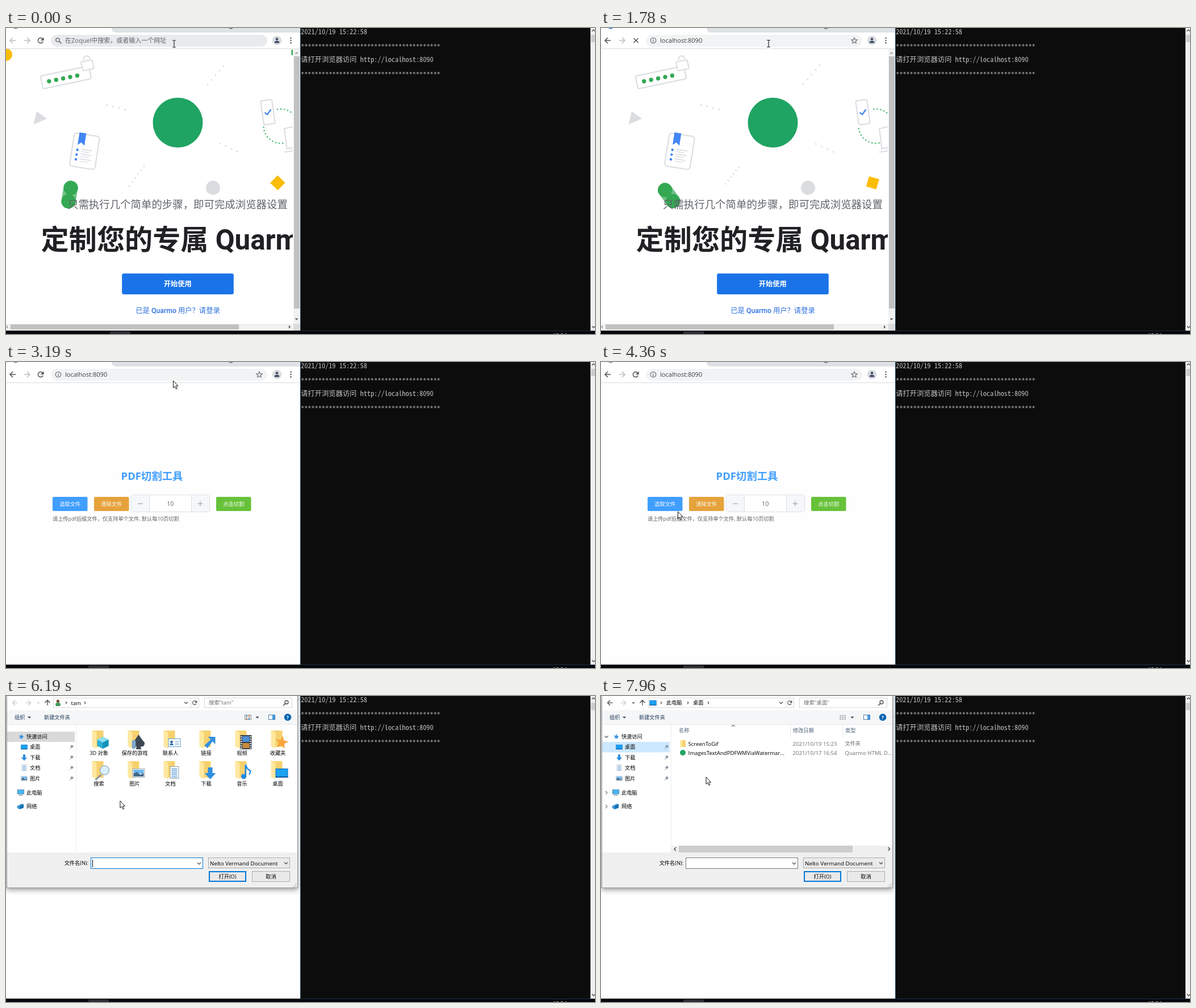
Recreate the animation shown at these times as an HTML page with a canvas. Size 1037 px wide and 540 px high, loop 8000 ms.

```html
<!DOCTYPE html>
<html lang="zh-CN">
<head>
<meta charset="utf-8">
<title>PDF切割工具</title>
<style>
html, body { margin: 0; width: 100%; height: 100%; overflow: hidden; background: #0c0c0c; }
canvas { display: block; }
</style>
</head>
<body>
<canvas id="stage" width="1037" height="540"></canvas>
<script>
const W = 1037, H = 540, LOOP = 8000;
const UI = '"Open Sans", "Noto Sans CJK SC", "Noto Sans CJK", sans-serif';
const WEB = 'Roboto, "Noto Sans CJK SC", "Noto Sans CJK", sans-serif';
const MONO = '"Noto Sans Mono CJK SC", "Liberation Mono", monospace';
const STARS = '"DejaVu Sans Mono", monospace';
const BLUE = '#1a73e8', GREY = '#dadce0', GREEN = '#34a853', AMBER = '#fbbc04', WIN = '#0078d7';

const stage = document.getElementById('stage').getContext('2d');
const layer = document.createElement('canvas');
layer.width = W;
layer.height = H;
const layerCtx = layer.getContext('2d');
let g = stage;

// Font size at which a console cell is 6.15 px wide
function cellSize(font) {
  g.font = '100px ' + font;
  return 615 / g.measureText('0').width;
}
const MONO_SIZE = cellSize(MONO), STAR_SIZE = cellSize(STARS);

function rect(x, y, w, h, fill) {
  g.fillStyle = fill;
  g.fillRect(x, y, w, h);
}
function paint(fill, stroke, lw = 1) {
  if (fill) { g.fillStyle = fill; g.fill(); }
  if (stroke) { g.strokeStyle = stroke; g.lineWidth = lw; g.stroke(); }
}
function round(x, y, w, h, r, fill, stroke, lw) {
  g.beginPath();
  g.roundRect(x, y, w, h, r);
  paint(fill, stroke, lw);
}
function box(x, y, w, h, fill, stroke) {
  rect(x, y, w, h, stroke);
  rect(x + 1, y + 1, w - 2, h - 2, fill);
}
function disc(x, y, r, fill, stroke, lw) {
  g.beginPath();
  g.arc(x, y, r, 0, 7);
  paint(fill, stroke, lw);
}
function arc(x, y, r, a, b, color, lw) {
  g.beginPath();
  g.arc(x, y, r, a, b);
  paint(null, color, lw);
}
function trace(p) {
  g.beginPath();
  for (let i = 0; i < p.length; i += 2) g.lineTo(p[i], p[i + 1]);
}
function line(p, color, lw) { trace(p); paint(null, color, lw); }
function poly(p, fill, stroke, lw) { trace(p); g.closePath(); paint(fill, stroke, lw); }
function text(s, x, y, size, color, o = {}) {
  g.font = `${o.weight || 400} ${size}px ${o.font || UI}`;
  g.textAlign = o.align || 'left';
  g.fillStyle = color;
  g.fillText(s, x, y + size * (o.drop ?? 0.37));
}
function placed(x, y, deg, scale, draw) {
  g.save();
  g.translate(x, y);
  g.rotate(deg * Math.PI / 180);
  g.scale(scale, scale);
  draw();
  g.restore();
}
// Keys are [time, value, ...]; returns the values interpolated at t.
function track(t, keys) {
  if (t <= keys[0][0]) return keys[0].slice(1);
  for (let i = 1; i < keys.length; i++) {
    const a = keys[i - 1], b = keys[i];
    if (t < b[0]) {
      const k = (t - a[0]) / (b[0] - a[0]);
      return a.slice(1).map((v, j) => v + (b[j + 1] - v) * k);
    }
  }
  return keys[keys.length - 1].slice(1);
}
function chevron(x, y, dir, color, s = 2.5, lw = 1.1) {
  placed(x, y, dir * 90, 1, () => line([-s / 2, -s, s / 2, 0, -s / 2, s], color, lw));
}
function caretDown(x, y, color, s = 3) {
  poly([x - s, y - s / 2, x + s, y - s / 2, x, y + s / 2], color);
}
function arrow(x, y, dir, color, s = 5, lw = 1.5) {
  placed(x, y, dir * 90, 1, () => {
    line([-s, 0, s, 0], color, lw);
    line([0, -s, s, 0, 0, s], color, lw);
  });
}
function reload(x, y, r, color, lw) {
  arc(x, y, r, 0.4, 5.5, color, lw);
  poly([x + r + 1, y - r - 1, x + r + 1, y, x, y], color);
}
function magnifier(x, y, r, color, flip = 1) {
  disc(x, y, r, null, color, 1.3);
  line([x + r * 0.7 * flip, y + r * 0.7, x + r * 2 * flip, y + r * 2], color, 1.5);
}

// Browser
function toolbar(t) {
  const focused = t >= 310 && t < 1780, opened = t >= 1780, loading = opened && t < 3000;
  rect(0, 0, 518, 37, '#fff');
  g.beginPath();
  g.moveTo(186, 0);
  g.quadraticCurveTo(186, 8, 194, 8);
  g.lineTo(518, 8);
  g.lineTo(518, 0);
  paint(t >= 5010 ? '#e7eaed' : '#dee1e6');
  disc(17, -4, 5, null, loading ? BLUE : '#80868b', 1.5);
  disc(396, -4, 5, null, '#5f6368', 1.3);
  rect(0, 36, 518, 1, GREY);

  const dark = '#4b4f54';
  arrow(12, 22, 2, opened ? dark : '#babcbe');
  arrow(37, 22, 0, '#babcbe');
  if (loading) {
    line([57.5, 18, 65.5, 26], dark, 1.5);
    line([65.5, 18, 57.5, 26], dark, 1.5);
  } else reload(61, 22, 4.6, dark, 1.5);

  if (focused) round(78.8, 11.8, 380.6, 21.2, 10.6, '#fff', '#3b82ee', 1.6);
  else round(79, 12, 381, 21, 10.5, opened ? '#f1f3f4' : '#e8eaed');

  if (opened) {
    disc(92, 22, 4.8, null, '#5f6368', 1.1);
    rect(91.4, 21, 1.2, 4, '#5f6368');
    rect(91.4, 19, 1.2, 1.2, '#5f6368');
    text('localhost:8090', 104, 22, 11, '#3c4043');
    const star = [];
    for (let i = 0; i < 10; i++) {
      const a = i * Math.PI / 5 - Math.PI / 2, r = i % 2 ? 2.4 : 5.4;
      star.push(446 + r * Math.cos(a), 22.5 + r * Math.sin(a));
    }
    poly(star, null, '#5f6368', 1.1);
  } else {
    magnifier(91, 21, 3.2, '#5f6368');
    if (focused) {
      const n = Math.max(0, Math.min(14, Math.floor((t - 1010) / 50)));
      text('localhost:8090'.slice(0, n), 104, 22, 11, '#202124');
    } else text('在Zoquel中搜索，或者输入一个网址', 104, 22, 11, '#5f6368');
  }
  disc(477, 22, 8.3, GREY);
  disc(477, 19.5, 2.2, '#3c4a62');
  round(472.8, 22.8, 8.4, 3.6, [3, 3, 0, 0], '#3c4a62');
  for (const y of [17.8, 22, 26.2]) disc(501.5, y, 1.2, dark);
}

function dots(x1, y1, x2, y2, n) {
  for (let i = 0; i < n; i++) {
    const k = i / (n - 1);
    disc(x1 + (x2 - x1) * k, y1 + (y2 - y1) * k, 1.4, '#d9dce0');
  }
}

function art(t) {
  const k = t / 2730;
  const [yx, yy] = track(t, [[0, 0, 47], [800, -14, 44], [2450, -14, 41], [2730, -8, 41]]);
  disc(yx, yy, 11, AMBER);
  const [bar] = track(t, [[0, 502.5], [500, 506]]);
  rect(bar, 38, 3, 10, GREEN);

  // Password field with padlock
  placed(106, 87, -12, 1, () => {
    round(-44, -11.5, 87, 23, 3, '#fff', GREY, 2);
    round(31, -21, 20, 16, 2, '#fff', GREY, 2);
    arc(42, -24, 5.5, Math.PI * 0.95, Math.PI * 2.05, GREY, 2);
  });
  const typed = t < 700 ? 5 : t < 900 ? 0 : Math.min(5, 1 + Math.floor((t - 900) / 220));
  for (let i = 0; i < typed; i++) disc(75.8 + 12.4 * i, 94 - 2.5 * i, 3.7, GREEN);

  dots(178 - 3 * k, 136, 210 - 3 * k, 144 - k, 4);
  dots(355 + 2 * k, 100 - 2 * k, 383 + 3 * k, 67 - 2 * k, 5);
  dots(217 + 4 * k, 279 - 6 * k, 243 - k, 244 + 3 * k, 6);
  dots(377 + 2 * k, 204 + k, 407 + 3 * k, 218 + k, 4);
  poly([54, 147, 72, 160, 48.5, 170], GREY);

  disc(302.5, 167, 44, '#1fa463');

  const spin = 0.12 * k;
  for (let a = 1.47 - spin; a < 3.1; a += 0.2) disc(484 + 30.5 * Math.cos(a), 173 + 30.5 * Math.sin(a), 1.4, '#5fc083');
  for (let a = -1.77 + spin; a < -0.7; a += 0.2) disc(484 + 30.5 * Math.cos(a), 173.5 + 30.5 * Math.sin(a), 1.4, '#5fc083');
  placed(461, 148.5, -8, 1, () => {
    round(-10, -21.5, 20, 43, 3, '#fff', GREY, 2);
    line([-5.5, 0, -1.5, 4, 6, -4], '#4285f4', 2.4);
  });
  line([506, 174, 490, 177.5, 494.5, 213, 506, 211], GREY, 2);
  line([490, 219, 506, 216.5], GREY, 2);

  // Notebook
  placed(138.5, 217, 9, 1, () => {
    round(-22.5, -29, 45, 59, 5, '#fff', GREY, 2);
    poly([-14, -31, -2, -31, -2, -9, -8, -14, -14, -9], '#4285f4');
    for (let i = 0; i < 3; i++) {
      disc(-13, i * 8.5, 2.2, '#4285f4');
      line([-6, i * 8.5 - 2, 13, i * 8.5 - 2], GREY, 1.8);
      line([-6, i * 8.5 + 2, 9, i * 8.5 + 2], GREY, 1.4);
    }
  });

  const [cx, cy, ang] = track(t, [[0, 112, 294, 99.5], [1000, 117, 295, 71.6], [2730, 123, 296.5, 33]]);
  placed(cx, cy, ang, 1, () => {
    round(-24.6, -12.6, 49.2, 25.2, 12.6, '#71c287');
    disc(-12, 0, 12.6, GREEN);
    disc(12, 0, 12.6, GREEN);
  });
  disc(364.5, 282, 12.5, GREY);
  const [turn] = track(t, [[0, 44], [1000, 37], [2730, -9]]);
  placed(478.3, 273.2, turn, 1, () => rect(-9.3, -9.3, 18.6, 18.6, AMBER));
}

function welcome(t) {
  rect(0, 37, 518, 497, '#fff');
  g.save();
  g.beginPath();
  g.rect(0, 37, 505, 485);
  g.clip();
  art(t);
  text('只需执行几个简单的步骤，即可完成浏览器设置', 109, 311, 18.43, '#5f6368', { font: WEB });
  text('定制您的专属 Quarmo', 61.6, 373, 49.15, '#202124', { weight: 700, font: WEB });
  round(204.2, 433.2, 196.6, 36.8, 3, BLUE);
  text('开始使用', 302.3, 451.3, 12.3, '#fff', { weight: 700, align: 'center', font: WEB });
  text('已是 Quarmo 用户？请登录', 302.5, 498, 12.3, '#2b6fdc', { weight: 500, align: 'center', font: WEB });
  g.restore();

  rect(506, 37, 12, 485, '#f1f1f1');
  rect(507, 50, 10, 445, '#c1c1c1');
  rect(0, 522, 506, 12, '#f1f1f1');
  rect(8, 523, 402, 9, '#c1c1c1');
  rect(506, 522, 12, 12, '#dcdcdc');
  poly([508.5, 45.5, 514.5, 45.5, 511.5, 42], '#a3a3a3');
  caretDown(511.5, 514, '#505050');
  poly([0, 527.5, 3, 524.5, 3, 530.5], '#a3a3a3');
  poly([498, 524.5, 498, 530.5, 501, 527.5], '#505050');
}

function button(x, label, color) {
  round(x, 238, 61.5, 25, 2.3, color);
  text(label, x + 30.7, 250.5, 9.2, '#fff', { align: 'center' });
}

function tool(t) {
  rect(0, 37, 518, 497, '#fefefe');
  if (t < 2900) return;
  text('PDF切割工具', 257, 201, 18.4, '#409eff', { weight: 700, align: 'center' });
  button(82, '选取文件', t < 4560 ? '#409eff' : t >= 4690 && t < 4770 ? '#3a8ee6' : '#66b1ff');
  button(155, '清除文件', '#e6a23c');
  round(220.5, 234.5, 138, 30, 3, '#fff', '#dcdfe6');
  rect(221, 235, 31, 29, '#f5f7fa');
  rect(327, 235, 31, 29, '#f5f7fa');
  rect(252, 235, 1, 29, '#dcdfe6');
  rect(326, 235, 1, 29, '#dcdfe6');
  line([232, 250, 241, 250], '#909399', 1);
  line([337.5, 250, 346.5, 250], '#909399', 1);
  line([342, 245.5, 342, 254.5], '#909399', 1);
  text('10', 289.3, 250, 10.75, '#606266', { align: 'center' });
  button(370, '点击切割', '#67c23a');
  text('请上传pdf后缀文件，仅支持单个文件, 默认每10页切割', 82, 277, 9.2, '#606266');
}

// Dialog icons, drawn around the origin about 22 px wide
const icons = {
  cube() {
    poly([-10, -5, 0, -10, 10, -5, 10, 6, 0, 11, -10, 6], '#2aaed4');
    poly([-10, -5, 0, -10, 10, -5, 0, 0], '#8ee0f2');
    poly([0, 0, 10, -5, 10, 6, 0, 11], '#1590b8');
  },
  spade() {
    poly([0, -14, 11, 2, -11, 2], '#3d4854');
    disc(-5, 2, 5.5, '#3d4854');
    disc(5, 2, 5.5, '#3d4854');
    poly([0, 0, 5, 12, -5, 12], '#3d4854');
    round(-12, -4, 7, 15, 3, '#7fa6c9');
  },
  card() {
    box(-11, -7, 22, 15, '#fff', '#5b9bd0');
    disc(-5, -1, 2.5, '#3d76a8');
    rect(-8, 2, 6, 3, '#3d76a8');
    rect(1, -2, 7, 1.5, '#7fb0d8');
    rect(1, 2, 7, 1.5, '#7fb0d8');
  },
  link() { poly([-4, -10, 9, -10, 9, 3, 4, -2, -5, 10, -10, 5, 1, -5], '#2f8fe0'); },
  film() {
    rect(-10, -13, 20, 25, '#37414c');
    rect(-6, -11, 12, 10, '#4c8fd6');
    rect(-6, 1, 12, 9, '#c98a3a');
    for (let y = -11; y < 11; y += 4) { rect(-9, y, 2, 2, '#fff'); rect(7, y, 2, 2, '#fff'); }
  },
  star(color = '#f7a43a') {
    const p = [];
    for (let i = 0; i < 10; i++) {
      const a = i * Math.PI / 5 - 1.4, r = i % 2 ? 5 : 12;
      p.push(r * Math.cos(a), r * Math.sin(a));
    }
    poly(p, color);
  },
  lens() {
    line([-3, 3, -13, 12], '#8a959f', 3);
    disc(3, -5, 8, '#d9effb', '#9fb4c2', 1.5);
  },
  picture() {
    box(-11, -8, 22, 16, '#fff', '#9aa7b2');
    rect(-9, -6, 18, 7, '#6db7ec');
    poly([-9, 6, -9, 1, -3, -2, 3, 3, 9, 0, 9, 6], '#41688a');
  },
  doc() {
    box(-8, -12, 16, 22, '#fff', '#8b9aa8');
    for (let y = -8; y < 8; y += 3.5) rect(-5, y, 10, 1.5, '#4d93d2');
  },
  down() { poly([-4, -10, 4, -10, 4, 0, 10, 0, 0, 11, -10, 0, -4, 0], '#2f8fe0'); },
  note() {
    disc(-4, 6, 4.5, '#1e8ae6');
    rect(-2, -15, 2.5, 21, '#1e8ae6');
    line([0, -13, 3, -7, 8, -4, 6, 3], '#1e8ae6', 2.2);
  },
  screen() {
    box(-11, -8, 22, 16, '#1ba1f2', '#0d6ebd');
    rect(-11, 6, 22, 2, '#0d5c9e');
  },
  computer() {
    box(-11, -9, 22, 15, '#48b4ee', '#5c7a90');
    rect(-6, 8, 12, 2, '#5c7a90');
  },
  network() {
    poly([-11, -2, 4, -9, 9, -5, 9, 5, -4, 9, -11, 5], '#3a9bdc');
    poly([-3, -2, 9, -8, 9, 3, -3, 8], '#1c6fae');
  },
  user() {
    disc(0, -5, 5, '#7a5636');
    round(-8, 0, 16, 11, 5, '#3f9a5f');
  }
};
const icon = (name, x, y, s = 1, arg) => placed(x, y, 0, s, () => icons[name](arg));

const folders = [
  ['3D 对象', 'cube'], ['保存的游戏', 'spade'], ['联系人', 'card'], ['链接', 'link'], ['视频', 'film'], ['收藏夹', 'star'],
  ['搜索', 'lens'], ['图片', 'picture'], ['文档', 'doc'], ['下载', 'down'], ['音乐', 'note'], ['桌面', 'screen']
];
const places = [
  ['桌面', 'screen', 90], ['下载', 'down', 108.5], ['文档', 'doc', 127], ['图片', 'picture', 145.5]
];

function folderGrid() {
  folders.forEach(([label, name], i) => {
    const x = 163.5 + 63 * (i % 6), y = i < 6 ? 76 : 130;
    rect(x - 10, y - 15, 18, 29, '#f6d16f');
    poly([x - 12, y - 16, x - 4, y - 12, x - 4, y + 17, x - 12, y + 13], '#ffe8a0');
    icon(name, x + 7, y + 6, 1);
    text(label, x, y + 24.5, 9.2, '#000', { align: 'center' });
  });
}

function fileList() {
  const grey = '#6d6d6d';
  [['名称', 137], ['修改日期', 338], ['类型', 430]].forEach(([s, x]) => text(s, x, 61, 9.2, '#4c607a'));
  rect(333, 51, 1, 22, '#e5e5e5');
  rect(425, 51, 1, 22, '#e5e5e5');
  chevron(233, 52.5, 3, '#6d6d6d', 3);
  rect(139, 78, 10, 12, '#f6d16f');
  rect(139, 78, 4, 12, '#ffe8a0');
  disc(144, 100, 5, '#1fa463');
  [['ScreenToGif', '2021/10/19 15:23', '文件夹'],
   ['ImagesTextAndPDFWMViaWatermar...', '2021/10/17 16:54', 'Quarmo HTML D...']].forEach((row, i) => {
    const y = 84 + 16.3 * i;
    text(row[0], 153.5, y, 9.6, '#000');
    text(row[1], 337.5, y, 9.6, grey);
    text(row[2], 429.5, y, i ? 9.6 : 9.2, grey);
  });
  rect(124, 264, 389, 12, '#f0f0f0');
  rect(137, 264, 306, 12, '#cdcdcd');
  chevron(130.5, 270, 2, '#404040', 3, 1.4);
  chevron(507, 270, 0, '#404040', 3, 1.4);
}

function dialog(t) {
  const loaded = t >= 5860, desktop = t >= 7480;
  rect(1, 0, 513, 339, '#8f9499');
  rect(2, 0, 511, 338, '#fff');

  arrow(16, 12, 2, desktop ? '#404040' : '#c8c8c8', 4.5, 1.2);
  arrow(39, 12, 0, '#c8c8c8', 4.5, 1.2);
  chevron(57, 12, 1, desktop ? '#404040' : '#c8c8c8', 2);
  arrow(73, 12, 3, '#404040', 4.5, 1.3);
  box(83, 3, 257, 18, '#fff', '#d9d9d9');
  rect(325, 3, 1, 18, '#d9d9d9');
  chevron(317, 12, 1, '#404040', 3);
  reload(332, 12, 3.4, '#505050', 1.1);
  if (desktop) {
    icon('screen', 91.5, 12, 0.56);
    text('此电脑', 115, 12, 9.2, '#000');
    text('桌面', 162, 12, 9.2, '#000');
    [106, 153, 189].forEach(x => chevron(x, 12, 0, '#505050', 2));
  } else {
    icon('user', 91.5, 12, 0.55);
    text('tam', 114.5, 12, 9.6, '#000');
    [106, 139].forEach(x => chevron(x, 12, 0, '#505050', 2));
  }
  box(349, 3, 155, 18, '#fff', '#d9d9d9');
  text(desktop ? '搜索"桌面"' : '搜索"tam"', 357, 12, 9.4, '#6d6d6d');
  magnifier(494, 11, 3, '#505050', -1);

  rect(2, 25, 511, 25, '#f5f6f7');
  rect(2, 50, 511, 1, '#e9eaec');
  text('组织', 15, 38, 9.2, '#1e395b');
  caretDown(41, 38, '#1e395b');
  text('新建文件夹', 67, 38, 9.2, '#1e395b');
  if (desktop) {
    for (let y = 34; y < 42; y += 3) [420, 424, 428].forEach(x => rect(x, y, 3, 1.2, '#8a8a8a'));
  } else {
    box(420, 33, 12, 9, '#fff', '#8a949e');
    for (let i = 0; i < 4; i++) rect(422 + 4.5 * (i % 2), i < 2 ? 34.5 : 38.5, 3, 2.5, i % 3 ? '#d08050' : '#4a90c8');
  }
  caretDown(442.5, 38, '#1e395b');
  box(462, 33, 12, 9, '#fff', '#4b7fb0');
  rect(469, 34, 4, 7, '#3f9be0');
  disc(496, 37.5, 6.2, '#0063b1');
  text('?', 496, 37.5, 9, '#fff', { weight: 700, align: 'center' });

  // Navigation pane
  if (!desktop) rect(2, 63, 119, 18, '#d9d9d9');
  if (desktop) rect(2, 81, 119, 18.5, '#cce8ff');
  else if (t >= 6860) rect(2, 82, 119, 18, '#e5f3ff');
  icon('star', 27, 72, 0.42, '#2f8fe0');
  text('快速访问', 36, 72, 9.2, '#000');
  for (const [label, name, y] of places) {
    icon(name, 32, y, 0.52);
    text(label, 42, y, 9.2, '#000');
    line([112, y + 3.5, 115, y + 0.5], '#8b98a4', 1);
    poly([113, y - 1, 116, y - 4, 119, y - 1, 116, y + 2], '#8b98a4');
  }
  icon('computer', 26, 170, 0.56);
  text('此电脑', 36, 170.5, 9.2, '#000');
  icon('network', 26, 195, 0.56);
  text('网络', 36, 195, 9.2, '#000');
  if (t >= 6480) {
    g.globalAlpha = Math.min(1, (t - 6440) / 250);
    chevron(9.5, 72, 1, '#505050', 3);
    chevron(9.5, 170.5, 0, '#808080', 3);
    chevron(9.5, 195, 0, '#808080', 3);
    g.globalAlpha = 1;
  }
  rect(123, 51, 1, 225, '#ededed');
  if (desktop) fileList();
  else if (loaded) folderGrid();

  rect(2, 276, 511, 62, '#f0f0f0');
  text('文件名(N):', 145, 295, 9.2, '#000', { align: 'right' });
  box(149, 285, 198, 20, '#fff', desktop ? '#7a7a7a' : WIN);
  chevron(340, 295.5, 1, '#404040', 3);
  if (!desktop && t >= 5800 && Math.floor((t - 5800) / 530) % 2 === 0) rect(152, 289, 1, 13, '#000');
  box(356, 285, 144, 19, '#eaeaea', '#adadad');
  text('Nelto Vermand Document', 359, 295, 9.8, '#000');
  chevron(493, 295, 1, '#404040', 3);
  rect(357, 309, 66, 19, WIN);
  rect(359, 311, 62, 15, '#e9e9e9');
  text('打开(O)', 390, 318.5, 9.2, '#000', { align: 'center' });
  box(433, 309, 67, 19, '#e9e9e9', '#adadad');
  text('取消', 466.5, 318.5, 9.2, '#000', { align: 'center' });
  for (let i = 0; i < 3; i++) for (let j = 0; j <= i; j++) rect(510 - 2.5 * j, 331 + 2.5 * i, 1.3, 1.3, '#a5a5a5');
}

function showDialog(t) {
  const [alpha, scale] = track(t, [[5310, 0, 0.95], [5390, 0.12, 0.959], [5470, 0.45, 0.975], [5560, 0.82, 0.99], [5640, 1, 1]]);
  g = layerCtx;
  g.clearRect(0, 0, W, H);
  dialog(t);
  g = stage;
  g.save();
  g.beginPath();
  g.rect(0, 0, 518, 534);
  g.clip();
  g.globalAlpha = alpha;
  g.shadowColor = 'rgba(0,0,0,.4)';
  g.shadowBlur = 10;
  g.shadowOffsetY = 3;
  g.translate(257.5, 143);
  g.scale(scale, scale);
  g.drawImage(layer, -257.5, -143);
  g.restore();
}

function consoleWindow(t) {
  rect(518, 0, 1, 535, '#1d3f52');
  rect(519, 0, 510, 534, '#0c0c0c');
  const color = '#c4c4c4', mono = { font: MONO };
  text('2021/10/19 15:22:58', 519, 6, MONO_SIZE, color, mono);
  text('请打开浏览器访问', 519, 55, 12.3, color, mono);
  text('http://localhost:8090', 623.5, 55, MONO_SIZE, color, mono);
  // Centre the raised asterisks on their rows
  g.font = `${STAR_SIZE}px ${STARS}`;
  const m = g.measureText('*');
  const drop = (m.actualBoundingBoxAscent - m.actualBoundingBoxDescent) / 2 / STAR_SIZE;
  for (const y of [30.5, 79.5]) text('*'.repeat(40), 519, y, STAR_SIZE, color, { font: STARS, drop });

  rect(1029, 0, 8, 534, '#f0f0f0');
  rect(1030, 12, 7, 13, '#cdcdcd');
  chevron(1034.5, 4.5, 3, '#505050', 3, 1.3);
  chevron(1034.5, 527.5, 1, '#505050', 3, 1.3);

  rect(0, 534, W, 6, '#05060c');
  rect(518, 534, 519, 1, '#1b3440');
  rect(t < 310 ? 183 : 145, 535, 36, 5, '#2b2d33');
  text('15:24', 975, 542, 9.6, '#fff', { align: 'center' });
}

const path = [
  [0, 296, 28], [850, 295, 27], [2640, 295, 28], [3190, 294, 33], [3700, 294, 33], [3900, 245, 140],
  [4130, 165, 287], [4360, 135, 264], [4530, 134, 251], [5100, 134, 251], [5390, 213, 215],
  [5640, 213, 215], [6190, 200.5, 185], [6330, 193, 183], [6440, 193, 183], [6690, 95, 115],
  [6820, 95, 115], [7080, 65, 96], [7200, 65, 96], [7320, 58, 88], [7480, 58, 88], [7960, 184.5, 143]
];
function pointer(t) {
  const [x, y] = track(t, path);
  if (t < 3000) {
    line([x, y - 5.5, x, y + 5.5], '#222', 1.2);
    for (const e of [-6, 6]) line([x - 3, y + e, x + 3, y + e], '#222', 1);
    return;
  }
  placed(x, y, 0, 1, () => poly([0.5, 0, 0.5, 12.5, 3.2, 10, 5.4, 14.6, 7.4, 13.7, 5.4, 9.2, 9, 9.2], '#fff', '#111', 1));
}

function draw(t) {
  if (t < 2820) welcome(t);
  else tool(t);
  toolbar(t);
  if (t >= 5310) showDialog(t);
  consoleWindow(t);
  pointer(t);
}

const start = performance.now();
function frame() {
  draw((performance.now() - start) % LOOP);
  requestAnimationFrame(frame);
}
frame();
</script>
</body>
</html>
```
